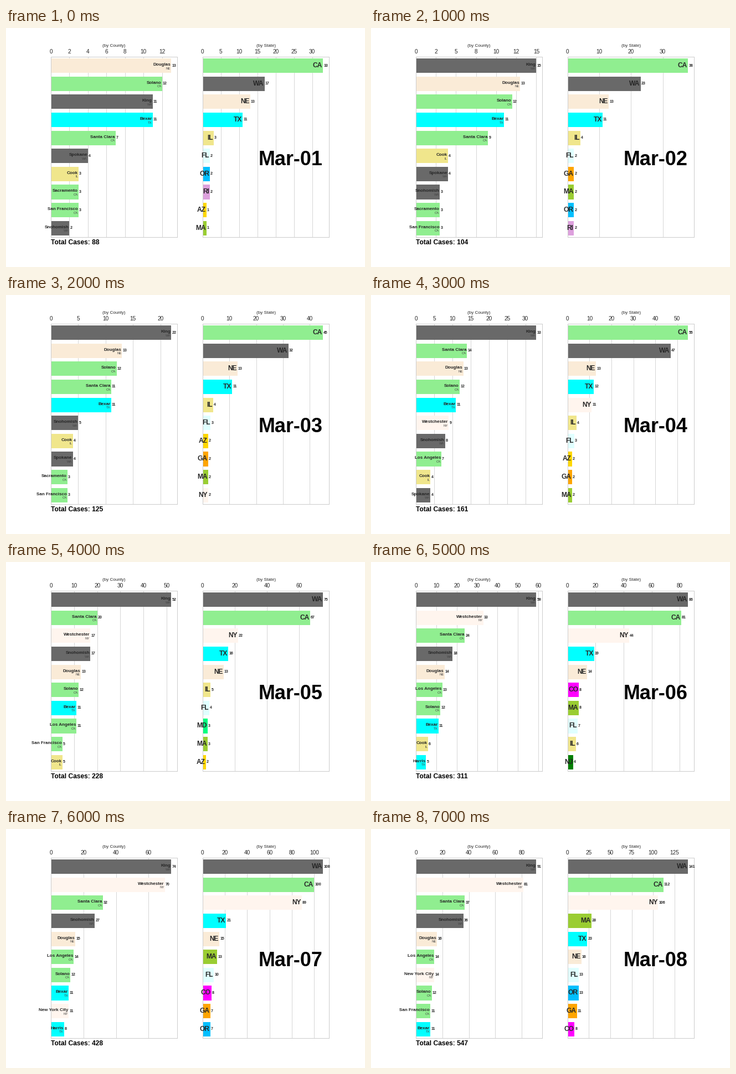
Animation, 648 px wide and 432 px high, one loop 8000 ms. Source, as a matplotlib script:

```python
import matplotlib.pyplot as plt
from matplotlib.animation import FuncAnimation

plt.rcParams.update({
    "font.family": "Liberation Sans",
    "text.color": ".15",
    "axes.labelcolor": ".15",
    "axes.edgecolor": ".8",
    "axes.linewidth": 1,
    "axes.axisbelow": True,
    "grid.color": ".8",
    "xtick.color": ".15",
    "xtick.major.size": 0,
})

COLORS = dict(
    CA="lightgreen", WA="dimgray", NE="antiquewhite", TX="cyan", IL="khaki",
    FL="lightcyan", OR="deepskyblue", RI="plum", AZ="gold", MA="yellowgreen",
    GA="orange", NY="seashell", MD="springgreen", CO="magenta", NJ="green",
)

HOME = {
    "King": "WA", "Spokane": "WA", "Snohomish": "WA",
    "Solano": "CA", "Santa Clara": "CA", "Sacramento": "CA",
    "San Francisco": "CA", "Los Angeles": "CA",
    "Douglas": "NE", "Cook": "IL", "Bexar": "TX", "Harris": "TX",
    "Westchester": "NY", "New York City": "NY",
}

# One entry per day: total, top counties, top states
DAYS = [
    (88,
     "Douglas 13, Solano 12, King 11, Bexar 11, Santa Clara 7, Spokane 4, "
     "Cook 3, Sacramento 3, San Francisco 3, Snohomish 2",
     "CA 33, WA 17, NE 13, TX 11, IL 3, FL 2, OR 2, RI 2, AZ 1, MA 1"),
    (104,
     "King 15, Douglas 13, Solano 12, Bexar 11, Santa Clara 9, Cook 4, "
     "Spokane 4, Snohomish 3, Sacramento 3, San Francisco 3",
     "CA 38, WA 23, NE 13, TX 11, IL 4, FL 2, GA 2, MA 2, OR 2, RI 2"),
    (125,
     "King 22, Douglas 13, Solano 12, Santa Clara 11, Bexar 11, Snohomish 5, "
     "Cook 4, Spokane 4, Sacramento 3, San Francisco 3",
     "CA 45, WA 32, NE 13, TX 11, IL 4, FL 3, AZ 2, GA 2, MA 2, NY 2"),
    (161,
     "King 33, Santa Clara 14, Douglas 13, Solano 12, Bexar 11, "
     "Westchester 9, Snohomish 8, Los Angeles 7, Cook 4, Spokane 4",
     "CA 55, WA 47, NE 13, TX 12, NY 11, IL 4, FL 3, AZ 2, GA 2, MA 2"),
    (228,
     "King 52, Santa Clara 20, Westchester 17, Snohomish 17, Douglas 13, "
     "Solano 12, Bexar 11, Los Angeles 11, San Francisco 5, Cook 5",
     "WA 75, CA 67, NY 22, TX 16, NE 13, IL 5, FL 4, MD 3, MA 3, AZ 2"),
    (311,
     "King 59, Westchester 33, Santa Clara 24, Snohomish 18, Douglas 14, "
     "Los Angeles 13, Solano 12, Bexar 11, Cook 6, Harris 5",
     "WA 86, CA 81, NY 44, TX 19, NE 14, CO 8, MA 8, FL 7, IL 6, NJ 4"),
    (428,
     "King 74, Westchester 70, Santa Clara 32, Snohomish 27, Douglas 15, "
     "Los Angeles 14, Solano 12, Bexar 11, New York City 11, Harris 8",
     "WA 108, CA 100, NY 89, TX 21, NE 15, MA 13, FL 10, CO 8, GA 7, OR 7"),
    (547,
     "King 91, Westchester 81, Santa Clara 37, Snohomish 36, Douglas 16, "
     "Los Angeles 14, New York City 14, Solano 12, San Francisco 11, Bexar 11",
     "WA 141, CA 112, NY 106, MA 28, TX 23, NE 16, FL 13, OR 13, GA 11, CO 8"),
]

fig, (left, right) = plt.subplots(1, 2, figsize=(9, 6), dpi=72)
fig.subplots_adjust(left=0.125, right=0.9, bottom=0.125, top=0.88, wspace=0.2)


def parse(text):
    rows = [row.rsplit(" ", 1) for row in text.split(", ")]
    return [(name, int(value)) for name, value in rows]


def draw_bars(ax, rows, caption):
    ax.clear()
    top = rows[0][1]
    dx = top / 200
    for i, (name, value) in enumerate(rows):
        state = HOME.get(name, name)
        ax.barh(i, value, height=0.8, color=COLORS[state], linewidth=0)
        if name in HOME:
            ax.text(value - dx, i, name, size=8, weight="bold",
                    ha="right", va="baseline")
            ax.text(value - dx, i + 0.2, state, size=6, color="#444444",
                    ha="right", va="baseline")
        else:
            ax.text(value - dx, i, name, size=12, weight="bold",
                    ha="right", va="center")
        ax.text(value + dx, i, f"{value:,}", size=7, weight="bold",
                ha="left", va="center")
    ax.set_xlim(0, top * 1.05)
    ax.set_ylim(len(rows) - 0.5, -0.5)
    ax.set_yticks([])
    ax.grid(True, axis="x")
    ax.xaxis.set_major_formatter("{x:,.0f}")
    ax.xaxis.set_ticks_position("top")
    ax.xaxis.set_label_position("top")
    ax.set_xlabel(caption, size=8)


def draw(day):
    total, counties, states = DAYS[day]
    draw_bars(left, parse(counties), "(by County)")
    draw_bars(right, parse(states), "(by State)")
    left.text(0, -0.04, f"Total Cases: {total}", transform=left.transAxes,
              size=12, weight="bold", color="black")
    right.text(0.95, 0.4, f"Mar-{day + 1:02d}", transform=right.transAxes,
               size=36, weight="bold", color="black", ha="right")


anim = FuncAnimation(fig, draw, frames=len(DAYS), init_func=lambda: None,
                     interval=1000, repeat=True, repeat_delay=0)
plt.show()
```
